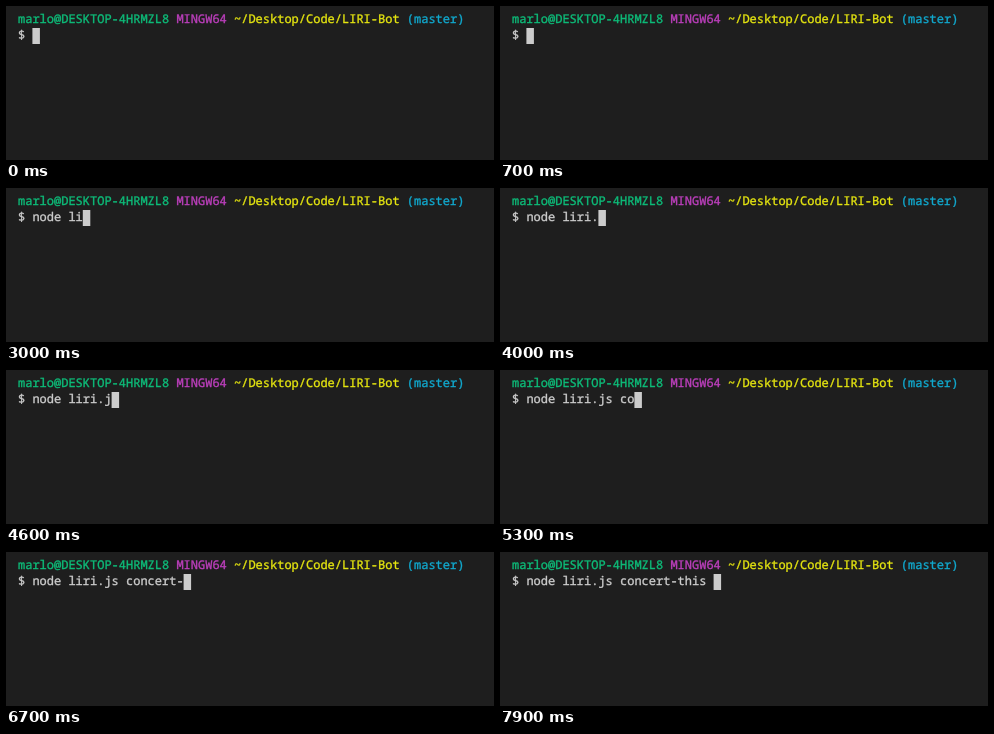
Recreate the animation shown at these times as an HTML page. Size 488x154 px, loop 8 s.

```html
<!DOCTYPE html>
<html lang="en">
<head>
<meta charset="utf-8">
<title>Terminal typing</title>
<style>
  html, body { margin: 0; width: 100%; height: 100%; overflow: hidden; background: #1e1e1e; }
  svg { display: block; }
  text {
    font: 12px "Noto Sans Mono", "DejaVu Sans Mono", monospace;
    text-rendering: geometricPrecision;
    white-space: pre;
    stroke-width: 0.35px;
  }
</style>
</head>
<body>
<svg id="terminal" width="488" height="154" viewBox="0 0 488 154"></svg>
<script>
const LOOP = 8000, LEFT = 12, CELL = 7.2;
const FOREGROUND = '#cccccc';
const terminal = document.getElementById('terminal');

const PROMPT = [
  ['marlo@DESKTOP-4HRMZL8', '#0dbc79'],
  ['MINGW64', '#bc3fbc'],
  ['~/Desktop/Code/LIRI-Bot', '#e5e510'],
  ['(master)', '#11a8cd'],
];
const COMMAND = 'node liri.js concert-this ';

// When each character of the command is typed, in ms.
const KEY_TIMES = [
  1000, 1200, 1300, 1400, 1700,
  2300, 2700, 3100, 3400, 3900, 4300, 4700, 4900,
  5100, 5300, 5500, 5700, 5900, 6100, 6300, 6600,
  6900, 7100, 7300, 7500, 7700,
];

const columnX = column => LEFT + column * CELL;

function add(name, attributes) {
  const node = document.createElementNS('http://www.w3.org/2000/svg', name);
  for (const key in attributes) node.setAttribute(key, attributes[key]);
  return terminal.appendChild(node);
}

// The thin stroke gives the letters the weight of a terminal font.
function addText(content, column, y, color) {
  const node = add('text', { x: columnX(column), y, fill: color, stroke: color });
  node.textContent = content;
  return node;
}

let column = 0;
for (const [content, color] of PROMPT) {
  addText(content, column, 17, color);
  column += content.length + 1;
}
addText('$', 0, 33, FOREGROUND);
const typed = addText('', 2, 33, FOREGROUND);
const cursor = add('rect', { y: 22, width: 7.5, height: 16, fill: FOREGROUND });

let shown = -1;
function draw() {
  const time = performance.now() % LOOP;
  const count = KEY_TIMES.filter(keyTime => keyTime <= time).length;
  if (count !== shown) {
    typed.textContent = COMMAND.slice(0, count);
    cursor.setAttribute('x', columnX(2 + count));
    shown = count;
  }
  requestAnimationFrame(draw);
}
draw();
</script>
</body>
</html>
```
